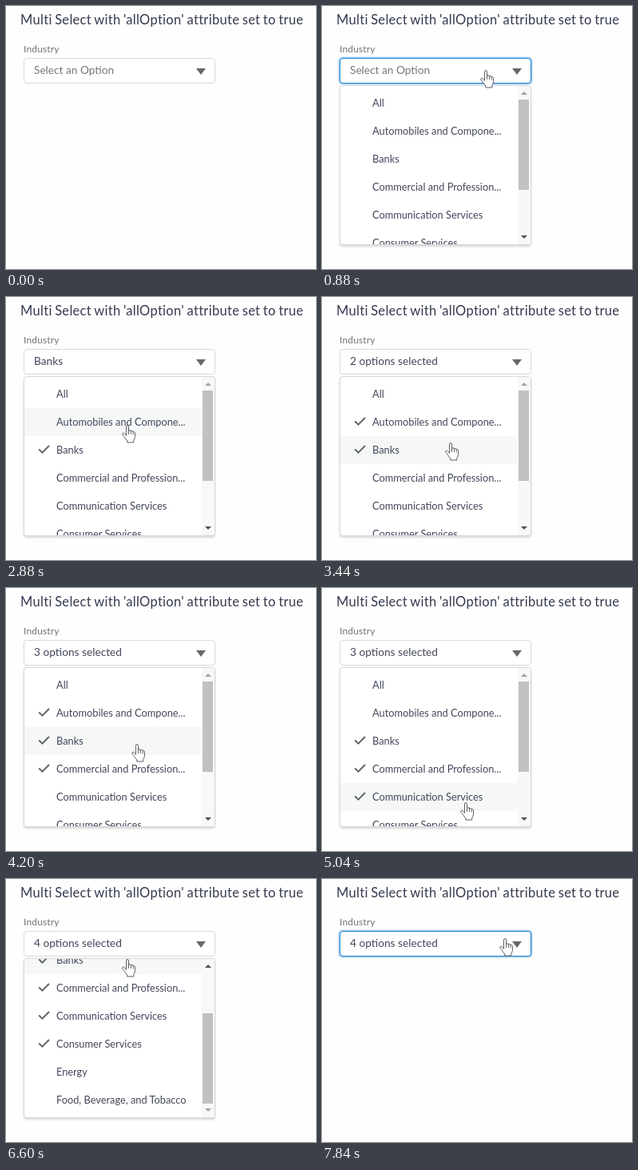
An HTML page for the animation above (8 s loop, 388 by 329 pixels).

```html
<!DOCTYPE html>
<html lang="en">
<head>
<meta charset="utf-8">
<title>Multi select</title>
<style>
  html, body { margin: 0; width: 100%; height: 100%; overflow: hidden; background: #fefefe; }
  body { position: relative; font: 12.8px/35px Lato, "Open Sans", sans-serif; color: #42465a; }
  body * { position: absolute; box-sizing: border-box; white-space: nowrap; }
  h1 { left: 18px; top: 7px; margin: 0; font-size: 16.5px; font-weight: 400; line-height: 21px; letter-spacing: .3px; word-spacing: -1px; color: #363a50; }
  label { left: 22px; top: 45px; font-size: 12px; line-height: 18px; letter-spacing: .15px; color: #70737a; }
  #field { left: 22px; top: 65px; width: 240px; height: 32px; background: #fff; border: 1px solid #d9d9dc; border-radius: 4px; }
  #field.focus { border-color: #1a86d8; box-shadow: 0 0 3px #0070d2; }
  #value { left: 12px; top: -1px; font-size: 13.7px; line-height: 30px; }
  #value.empty { color: #74777e; }
  #field i { left: 215px; top: 12px; border: 6px solid transparent; border-top: 8px solid #66686c; border-bottom: 0; }
  #menu { left: 22px; top: 99px; width: 240px; height: 200px; background: #fff; border: 1px solid #d9d9dc; border-radius: 4px; box-shadow: 0 2px 3px rgba(0,0,0,.16); overflow: hidden; }
  #list { left: 0; top: 4px; width: 222px; }
  .row { left: 0; width: 222px; height: 35px; }
  .row.hover { background: #f6f8f8; }
  .row span { left: 40px; top: 0; }
  .row svg { left: 17px; top: 10px; }
  #bar { left: 222px; top: 0; width: 16px; height: 198px; background: #f8f8f8; }
  #thumb { left: 1px; top: 17px; width: 13px; height: 113px; background: #c1c1c1; }
  #bar i { left: 4px; border: 4px solid transparent; }
  #bar #up { top: 7px; border-top: 0; border-bottom-color: currentColor; }
  #bar #down { top: 187px; border-bottom: 0; border-top-color: currentColor; }
  #hand, #arrow { left: 0; top: 0; overflow: visible; }
</style>
</head>
<body>
<h1>Multi Select with 'allOption' attribute set to true</h1>
<label>Industry</label>
<div id="field"><span id="value"></span><i></i></div>
<div id="menu">
  <div id="list"></div>
  <div id="bar"><i id="up"></i><div id="thumb"></div><i id="down"></i></div>
</div>
<svg id="hand" width="18" height="23" fill="#fff" stroke="#5c5f66" stroke-linejoin="round" stroke-linecap="round">
  <path d="M5.5 13V2.2Q5.5.6 7 .6T8.5 2.2V8Q8.6 6.6 10 6.7T11.4 8.3Q11.6 7.2 12.9 7.4T14.2 9Q14.5 8.2 15.5 8.5T16.5 10.3V14.5Q16.5 17 14.8 19.3V22H6.8V20Q5 18 3.4 15.4L.9 12.2Q.2 10.8 1.4 10.3T3.6 11Z"/>
  <path d="M8.5 8V11.5M11.4 8.3V11.5M14.2 9V12" fill="none"/>
</svg>
<svg id="arrow" width="13" height="20" fill="#fff" stroke="#5c5f66" stroke-linejoin="round">
  <path d="M.5.5V16L4 12.7L6.4 18.3L8.7 17.3L6.3 11.8H11.4Z"/>
</svg>
<script>
const $ = id => document.getElementById(id);
const LOOP = 8000, APPEAR = 40, ROW = 35, MAX_SCROLL = 90, THUMB_TRAVEL = 51;
const MOVE = 600, PAUSE = 200, CLICK = 160;
const names = ['All', 'Automobiles and Compone...', 'Banks', 'Commercial and Profession...',
  'Communication Services', 'Consumer Services', 'Energy', 'Food, Beverage, and Tobacco'];

const rows = names.map((name, i) => {
  const row = document.createElement('div');
  row.className = 'row';
  row.style.top = i * ROW + 'px';
  row.innerHTML = `<svg width="16" height="14" fill="none" stroke="#62656a" stroke-width="2"><path d="M1.2 6.5L5.4 10.7L14 2"/></svg><span>${name}</span>`;
  $('list').append(row);
  return row;
});

// The pointer reaches (x, y) at time t, then clicks the field or an option
const stops = [
  { t: APPEAR, x: 262, y: 268 },
  { t: 680, x: 205, y: 80, hit: 'field' },
  { t: 1520, x: 199, y: 167 },
  { t: 1920, x: 166, y: 190, hit: 2 },
  { t: 2800, x: 152, y: 160, hit: 1 },
  { t: 3440, x: 161, y: 182 },
  { t: 3880, x: 165, y: 222, hit: 3 },
  { t: 4360, x: 163, y: 155, hit: 1 },
  { t: 4800, x: 180, y: 268, hit: 4 },
  { t: 5760, x: 168, y: 204, hit: 5 },
  { t: 6600, x: 152, y: 100 },
  { t: 7360, x: 208, y: 79, hit: 'field' },
  { t: 7840, x: 229, y: 74 }
];

function ramp(t, a, b) {
  const p = Math.min(1, Math.max(0, (t - a) / (b - a)));
  return p * p * (3 - 2 * p);
}

function pointer(t) {
  let { x, y } = stops[0];
  stops.slice(1).forEach((stop, i) => {
    const k = ramp(t, Math.max(stops[i].t + PAUSE, stop.t - MOVE), stop.t);
    x += (stop.x - x) * k;
    y += (stop.y - y) * k;
  });
  return [Math.round(x), Math.round(y)];
}

function stateAt(t) {
  const chosen = new Set();
  let open = false, focus = false;
  for (const { t: at, hit } of stops) {
    if (hit === undefined || t < at + CLICK) continue;
    focus = hit === 'field';
    if (focus) open = !open;
    else if (!chosen.delete(hit)) chosen.add(hit);
  }
  return { chosen, open, focus };
}

function draw(t) {
  const [x, y] = pointer(t);
  const { chosen, open, focus } = stateAt(t);
  const scroll = Math.round(MAX_SCROLL * ramp(t, 5320, 5520));

  const n = chosen.size;
  $('value').textContent = n > 1 ? n + ' options selected' : n ? names[[...chosen][0]] : 'Select an Option';
  $('value').className = n ? '' : 'empty';
  $('field').className = focus ? 'focus' : '';

  $('menu').style.display = open ? '' : 'none';
  $('list').style.transform = `translateY(${-scroll}px)`;
  $('thumb').style.transform = `translateY(${scroll / MAX_SCROLL * THUMB_TRAVEL}px)`;
  $('up').style.color = scroll > 0 ? '#505050' : '#a3a3a3';
  $('down').style.color = scroll < MAX_SCROLL ? '#505050' : '#a3a3a3';
  const over = y >= 100 ? Math.floor((y - 104 + scroll) / ROW) : -1;
  rows.forEach((row, i) => {
    row.classList.toggle('hover', i === over);
    row.firstChild.style.display = chosen.has(i) ? '' : 'none';
  });

  const hand = open || y > 64 && y < 97;
  $('hand').style.display = hand ? '' : 'none';
  $('arrow').style.display = hand || t < APPEAR ? 'none' : '';
  $('hand').style.transform = `translate(${x - 7}px, ${y}px)`;
  $('arrow').style.transform = `translate(${x}px, ${y}px)`;
}

const start = performance.now();
function tick(now) {
  draw(Math.max(0, now - start) % LOOP);
  requestAnimationFrame(tick);
}
draw(0);
requestAnimationFrame(tick);
</script>
</body>
</html>
```
